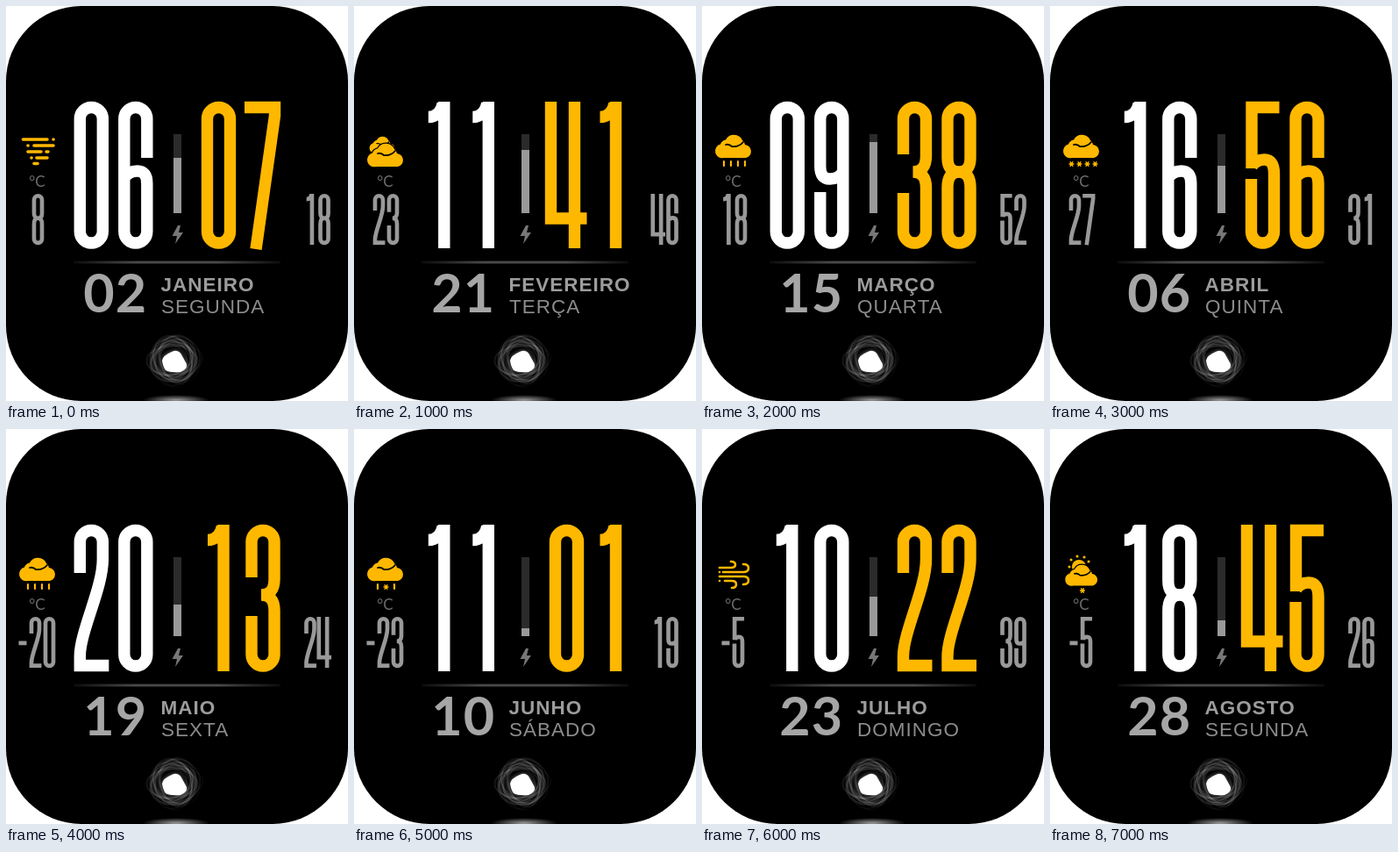
An HTML page for the animation above (8000 ms loop, 390x450 px).

```html
<!DOCTYPE html>
<html lang="pt">
<head>
<meta charset="utf-8">
<style>
  html, body { margin: 0; height: 100%; overflow: hidden; background: #fff; }
  svg { display: block; width: 390px; height: 450px; }
  .digit { fill: none; stroke-width: 13.4; }
  .day { font: 700 61px Lato, sans-serif; text-anchor: middle; fill: #a6a6a6; }
  .month, .week { font: 22.5px "Liberation Sans", Arial, sans-serif; letter-spacing: .045em; fill: #8c8c8c; }
  .month { font-weight: 700; fill: #9c9c9c; }
  .unit { font: 17px Lato, sans-serif; text-anchor: middle; fill: #6c6c6c; }
  .line { fill: none; stroke: #ffb800; stroke-linecap: round; }
  .gap { fill: none; stroke: #000; stroke-width: 1.8; stroke-linecap: round; }
</style>
</head>
<body>
<svg viewBox="0 0 390 450">
  <defs>
    <linearGradient id="fade">
      <stop stop-color="#fff" stop-opacity=".15"/>
      <stop offset=".3" stop-color="#fff"/>
      <stop offset=".7" stop-color="#fff"/>
      <stop offset="1" stop-color="#fff" stop-opacity=".15"/>
    </linearGradient>
    <radialGradient id="floor">
      <stop stop-color="#999"/>
      <stop offset="1" stop-color="#999" stop-opacity="0"/>
    </radialGradient>
    <filter id="soft" x="-50%" y="-50%" width="200%" height="200%"><feGaussianBlur stdDeviation="2.5"/></filter>
    <clipPath id="case"><rect width="390" height="450" rx="86"/></clipPath>
  </defs>
  <g clip-path="url(#case)">
    <rect width="390" height="450"/>
    <rect x="77" y="290" width="236" height="4" fill="url(#fade)" opacity=".13"/>
    <rect x="77" y="291" width="236" height="2" fill="url(#fade)" opacity=".18"/>
    <rect x="191" y="146" width="9" height="90" fill="#2b2b2b"/>
    <path d="M196 250L189.500 262H195L193 271L202 258H197L199 250Z" fill="#777"/>
    <text class="unit" x="35.500" y="206">°C</text>
    <ellipse cx="194" cy="449" rx="38" ry="6" fill="url(#floor)"/>
    <g id="rings" fill="none" stroke="#fff"></g>
    <path id="core" d="M178 404Q179 398 189 394Q197 390 201 399L206 408Q207 414 199 417Q188 418 182 415Q179 411 178 404Z" fill="#fff"/>
    <g id="face"></g>
  </g>
</svg>
<script>
const $ = id => document.getElementById(id);
const AMBER = '#ffb800';

// Condensed numerals as centre lines, 167 high and centred on x = 0
const GLYPHS = {
  0: 'M-13 19.500A13 13 0 0 1 13 19.500V148A13 13 0 0 1-13 148Z',
  1: 'M5.500 0V167M4 2C2 12-4 17.500-12.500 17.500',
  2: 'M-13 55V19.500A13 13 0 0 1 13 19.500V40C13 72-13 122-13 150V160.500H20',
  3: 'M-13 60V19.500A13 13 0 0 1 13 19.500V62Q13 80-2 80Q13 80 13 98V148A13 13 0 0 1-13 148V104',
  4: 'M-18 0V133H23M9 0V167',
  5: 'M19 6.500H-12.500V76M-12.500 74Q-8 66 2 66Q13 66 13 82V148A13 13 0 0 1-13 148V88',
  6: 'M13 64V19.500A13 13 0 0 0-13 19.500V148A13 13 0 0 0 13 148V93Q13 79 2 79Q-8 79-13 87',
  7: 'M-21 6.500H13.500V16L-8 168',
  8: 'M-13 19.500A13 13 0 0 1 13 19.500V64Q13 80 0 80Q-13 80-13 64ZM-13 98Q-13 80 0 80Q13 80 13 98V148A13 13 0 0 1-13 148Z',
  9: 'M-13 103V148A13 13 0 0 0 13 148V19.500A13 13 0 0 0-13 19.500V74Q-13 88-2 88Q8 88 13 80',
  '-': 'M-13 86H13'
};

const glyph = (c, x, y, scale, color) =>
  `<path class="digit" d="${GLYPHS[c]}" stroke="${color}" transform="translate(${x} ${y}) scale(${scale})"/>`;
const big = (text, x, color) => [...text].map((c, i) => glyph(c, x + i * 50.5, 109, 1, color)).join('');

function small(text, center) {
  const width = c => c === '-' ? 10 : 16;
  let x = center - [...text].reduce((sum, c) => sum + width(c), 0) / 2;
  return [...text].map(c => {
    const mid = x + (c === '-' ? 3.5 : 8);
    x += width(c);
    return glyph(c, mid, 214, .347, '#999');
  }).join('');
}

// Weather icons
const line = (d, width = 3) => `<path class="line" d="${d}" stroke-width="${width}"/>`;
const cloud = (x, y, s = 1) => `<g transform="translate(${x} ${y}) scale(${s})">
  <path d="M8 26A8 8 0 0 1 4 10.500A8 8 0 0 1 10 5.500A10.500 10.500 0 0 1 29 6Q32 8 32 11A7.600 7.600 0 0 1 33 26Z" fill="${AMBER}" stroke="#000" stroke-width="2.500" paint-order="stroke"/>
  <path class="gap" d="M10 11Q14 10 17 13Q25 14 30 8"/></g>`;
const flake = (x, y) => line(`M${x - 2.5} ${y}h5M${x - 1.4} ${y - 2.4}l2.8 4.8M${x + 1.4} ${y - 2.4}l-2.8 4.8`, 1.3);
const drops = xs => line(xs.map(x => `M${x} 177v5`).join(''), 2.2);

const ICONS = {
  tornado: () => line('M19.500 152H47M54 152h.1M25 159h.1M32 159H54M25 166H40M46 166h2M29 173h.1M35 173H47M32 179.500H36', 3.6),
  clouds: () => cloud(19, 149, .7) + cloud(17, 157),
  rain: () => cloud(17, 147) + drops([25, 33, 41, 49]),
  snow: () => cloud(17, 147) + [24.5, 33.5, 42.5, 51.5].map(x => flake(x, 180)).join(''),
  sleet: () => cloud(17, 147) + drops([27, 46]) + flake(36.5, 180),
  wind: () => line('M20 158H33Q38 158 38 154.500T33 151M24 163H47Q53 163 53 158.500T47 154M20 168H47Q53 168 53 172.500T47 177M26 173H34Q39 173 39 177T34 181M20 163h.1M20 173h.1', 2.6),
  sunSnow: () => `<circle cx="33" cy="157" r="8" fill="${AMBER}"/>` +
    line('M22 157h.1M24 149h.1M31 145h.1M39 146h.1M44 151h.1') + cloud(19, 155, .9) + flake(37, 184)
};

const STATES = [
  ['06', '07', 'tornado', '8', '18', 7, '02', 'JANEIRO', 'SEGUNDA'],
  ['11', '41', 'clouds', '23', '46', 8, '21', 'FEVEREIRO', 'TERÇA'],
  ['09', '38', 'rain', '18', '52', 9, '15', 'MARÇO', 'QUARTA'],
  ['16', '56', 'snow', '27', '31', 6, '06', 'ABRIL', 'QUINTA'],
  ['20', '13', 'rain', '-20', '24', 4, '19', 'MAIO', 'SEXTA'],
  ['11', '01', 'sleet', '-23', '19', 1, '10', 'JUNHO', 'SÁBADO'],
  ['10', '22', 'wind', '-5', '39', 5, '23', 'JULHO', 'DOMINGO'],
  ['18', '45', 'sunSnow', '-5', '26', 2, '28', 'AGOSTO', 'SEGUNDA']
];

const face = ([hour, minute, icon, temp, second, level, day, month, week]) =>
  big(hour, 97.3, '#fff') + big(minute, 242.5, AMBER) + ICONS[icon]() +
  small(temp, 36.5) + small(second, 355) +
  `<rect x="191" y="${236 - level * 9}" width="9" height="${level * 9}" fill="#999"/>
  <text class="day" x="106" y="349">${day[0]}</text>
  <text class="day" x="142.500" y="349">${day[1]}</text>
  <text class="month" x="176.500" y="325">${month}</text>
  <text class="week" x="177" y="349.500">${week}</text>`;

// Dark scribbled rings around the light
let seed = 7;
const random = () => (seed = seed * 16807 % 2147483647) / 2147483647;
const range = (a, b) => a + (b - a) * random();
$('rings').innerHTML = Array.from({ length: 30 }, () => {
  const x = range(188, 196), y = range(399, 406);
  return `<ellipse cx="${x}" cy="${y}" rx="${range(17, 30)}" ry="${range(16, 28)}"
    stroke-width="${range(.5, 2)}" opacity="${range(.02, .1)}" transform="rotate(${range(0, 180)} ${x} ${y})"/>`;
}).join('');
const glow = $('core').cloneNode();
glow.removeAttribute('id');
glow.setAttribute('filter', 'url(#soft)');
glow.setAttribute('opacity', '.5');
$('core').before(glow);

let shown = -1;
function tick() {
  const index = Math.floor(performance.now() / 1000) % STATES.length;
  if (index !== shown) $('face').innerHTML = face(STATES[shown = index]);
  requestAnimationFrame(tick);
}
tick();
</script>
</body>
</html>
```
